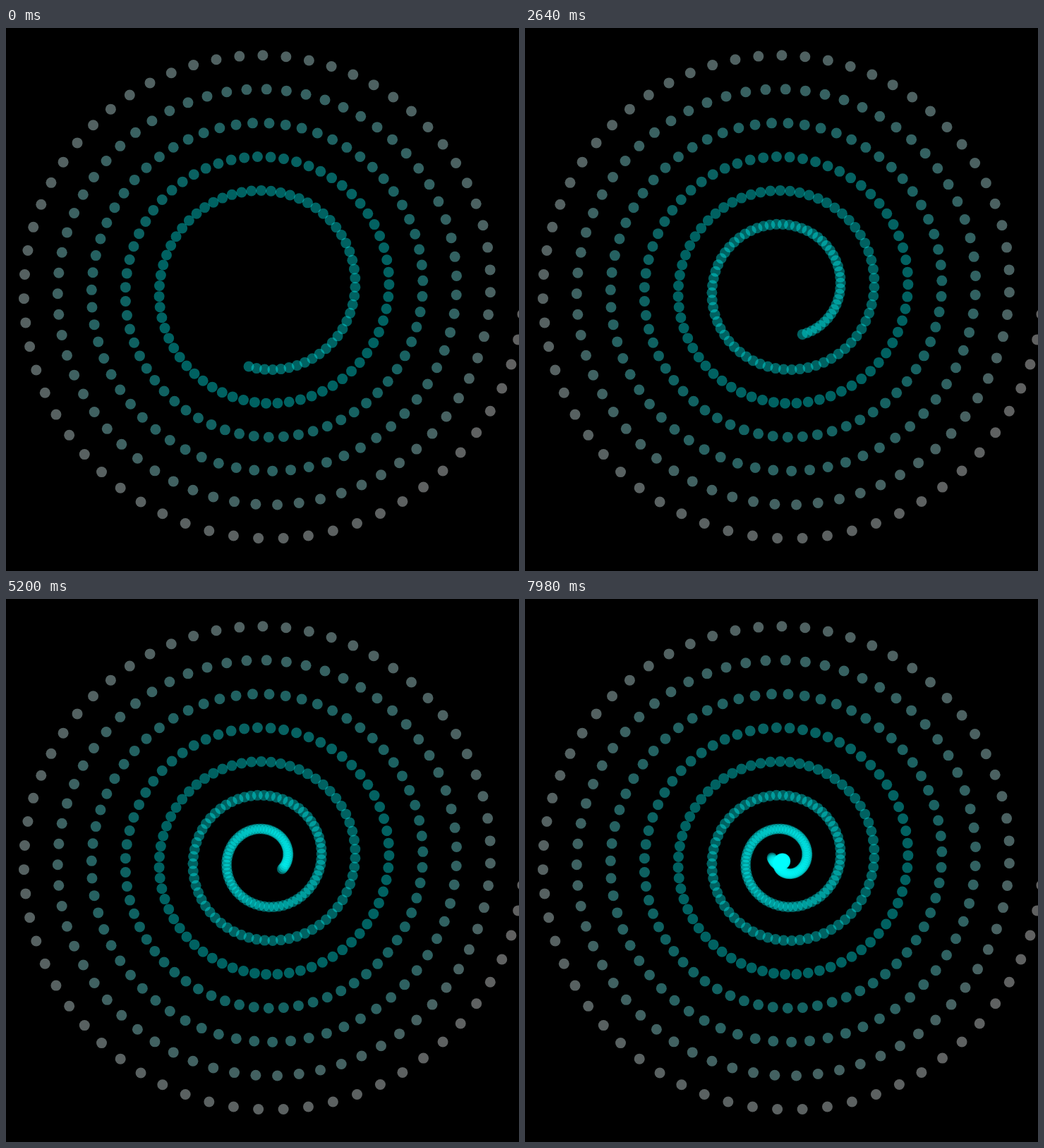
Animation, 727 px wide and 770 px high, one loop 8000 ms. Source, as an HTML page with a canvas:

```html
<!DOCTYPE html>
<html>
<head>
<meta charset="utf-8">
<title>Dot spiral</title>
<style>
  html, body { margin: 0; width: 100%; height: 100%; overflow: hidden; background: #000; }
  canvas { display: block; }
</style>
</head>
<body>
<canvas id="stage" width="727" height="770"></canvas>
<script>
const ctx = document.getElementById('stage').getContext('2d');
const LOOP = 8000;
const CENTER = { x: 368, y: 369.4 };
const START_RADIUS = 366.5, RADIUS_STEP = 0.763, ANGLE_STEP = 0.1;
const DOT_RADIUS = 7.5, ALPHA = 0.38;

// Dots arrive in bursts of three, 20 ms apart, every 140 ms.
function lastDot(time) {
  const t = time + 20;
  const burst = Math.floor(t / 140);
  const inBurst = Math.min(2, Math.floor((t % 140) / 20));
  const catchUp = time >= 840 ? 1 : 0;
  return 331 + burst * 3 + inBurst + catchUp;
}

// The radius shrinks past zero, so the spiral runs through its centre.
function drawDot(n) {
  const radius = START_RADIUS - RADIUS_STEP * n;
  const angle = ANGLE_STEP * n;
  const red = Math.max(0, 255 - n);
  ctx.fillStyle = `rgba(${red}, 255, 255, ${ALPHA})`;
  ctx.beginPath();
  ctx.arc(CENTER.x + radius * Math.cos(angle), CENTER.y + radius * Math.sin(angle),
          DOT_RADIUS, 0, 2 * Math.PI);
  ctx.fill();
}

function render(time) {
  ctx.fillStyle = '#000';
  ctx.fillRect(0, 0, 727, 770);
  const last = lastDot(time);
  for (let n = 0; n <= last; n++) drawDot(n);
}

const startTime = performance.now();
function tick() {
  render((performance.now() - startTime) % LOOP);
  requestAnimationFrame(tick);
}
tick();
</script>
</body>
</html>
```
